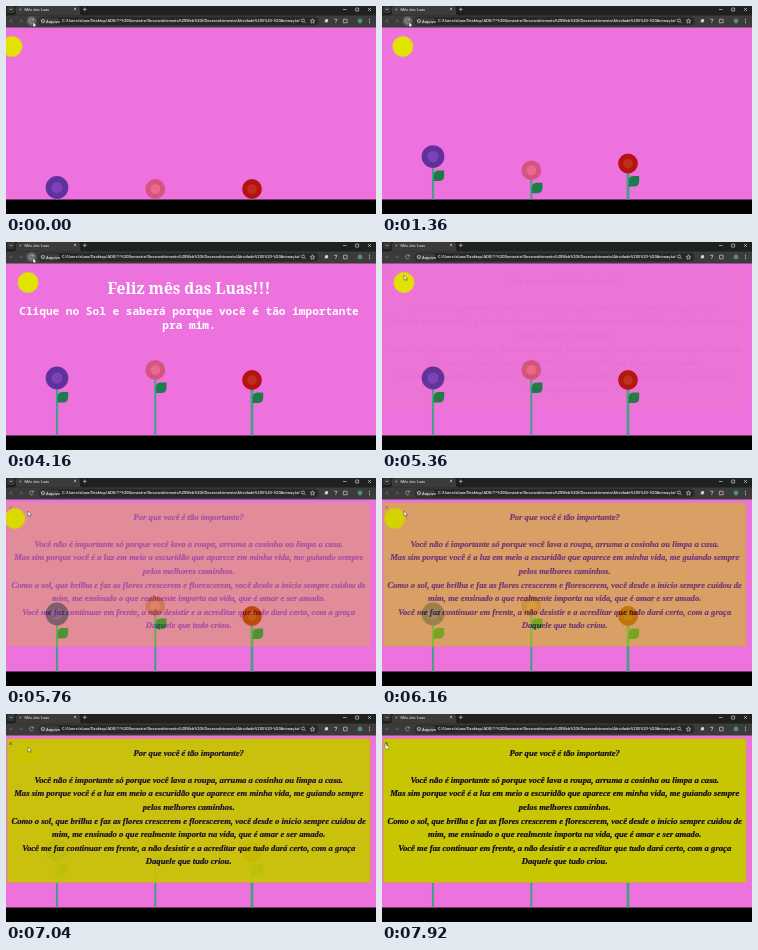
An HTML page for the animation above (8000 ms loop, 370 by 208 pixels).

```html
<!DOCTYPE html>
<html lang="pt-BR">
<head>
<meta charset="utf-8">
<title>Mês das Luas</title>
<style>
  html, body { margin: 0; width: 100%; height: 100%; overflow: hidden; background: #000; }
  svg { display: block; width: 100vw; height: 100vh; }
  .ui { font-family: Roboto, Inter, sans-serif; fill: #e6e6e6; }
  .title { font: bold 15.5px "Noto Serif", serif; }
  .mono { font: 600 11.1px "Noto Sans Mono", "DejaVu Sans Mono", monospace; }
  .letter { font: italic bold 8.65px "Liberation Serif", serif; fill: #0d0926; stroke: #0d0926; stroke-width: .2; }
  .icon { fill: none; stroke: #c8c8c8; stroke-width: .7; }
</style>
</head>
<body>
<svg viewBox="0 0 370 208">
  <defs>
    <clipPath id="page"><rect y="21" width="370" height="172.4"/></clipPath>
    <clipPath id="url"><rect x="54" y="10" width="240" height="10"/></clipPath>
  </defs>
  <rect width="370" height="208"/>

  <g clip-path="url(#page)">
    <rect y="21" width="370" height="173" fill="#ee72de"/>
    <circle id="sun" cy="40.5" r="10.3" fill="#e3e300" stroke="#e4b658" stroke-width=".7"/>
    <g id="garden"></g>
    <g id="greeting" fill="#fff" text-anchor="middle">
      <text class="title" x="183" y="51.5">Feliz mês das Luas!!!</text>
      <text class="mono" x="183" y="73">Clique no Sol e saberá porque você é tão importante</text>
      <text class="mono" x="183" y="87">pra mim.</text>
    </g>
    <g id="modal" text-anchor="middle">
      <rect x=".8" y="24.2" width="363.8" height="144.7" rx="1" fill="#d59a55"/>
      <rect x="1.6" y="25" width="362.2" height="143.1" rx="1" fill="#c8c502"/>
      <path d="M3.3 28.2l2.6 2.6m0-2.6l-2.6 2.6" stroke="#333" stroke-width=".7"/>
    </g>
  </g>

  <g class="ui">
    <rect width="370" height="10" fill="#1f2020"/>
    <rect y="9.5" width="370" height="12" fill="#3b3b3b"/>
    <path d="M7 9.6Q10 9.6 10 7V2.5Q10 0 13 0H71Q74 0 74 2.5V7Q74 9.6 77 9.6Z" fill="#3b3b3b"/>
    <rect x="1" y="0" width="8" height="7" rx="2" fill="#343535"/>
    <path class="icon" d="M3.8 2.7l1.3 1.3 1.3-1.3M68 2l2.2 2.2m0-2.2L68 4.2M77 3.3h3.6M78.8 1.5v3.6M337 3.5h3.5M349.7 2h3v3h-3zM362 2l3 3m0-3l-3 3"/>
    <circle cx="14.3" cy="3.4" r="1" fill="#888"/>
    <text x="18.5" y="5" font-size="4">Mês das Luas</text>
    <path class="icon" d="M7 15H3.5m1.7-1.7L3.5 15l1.7 1.7M13 15h3.5m-1.7-1.7l1.7 1.7-1.7 1.7" opacity=".3"/>
    <circle id="hover" cx="25.5" cy="15" r="4.8" fill="#656565"/>
    <path class="icon" d="M27.3 14a2 2 0 1 0 .1 1.8M27.5 12.5v1.6h-1.6" opacity=".7"/>
    <rect x="32.5" y="10.8" width="280" height="8.6" rx="4.3" fill="#282828"/>
    <rect x="33.5" y="11.7" width="20" height="6.8" rx="3.4" fill="#3b3b3b"/>
    <circle class="icon" cx="37" cy="15" r="1.6"/>
    <path class="icon" d="M37 14.8v.9"/>
    <text x="40" y="16.5" font-size="4" font-weight="500">Arquivo</text>
    <text x="56" y="16.4" font-size="4.05" font-weight="500" clip-path="url(#url)">C:/Users/aluno/Desktop/ADS/1º%20Semestre/Desenvolvimento%20Web%20I/Desenvolvimento/Atividade%205%20-%20Animação%20CSS...</text>
    <circle class="icon" cx="297" cy="14.5" r="1.5"/>
    <path class="icon" d="M298.2 15.7l1.4 1.4M306.5 12.7l.7 1.6 1.7.1-1.3 1.1.4 1.7-1.5-.9-1.5.9.4-1.7-1.3-1.1 1.7-.1z"/>
    <path class="icon" d="M318.5 16.7l2.8-3.4M328 13.3h3l-1.5 3.4M337.5 13.3h3.6v3.5h-3.6z"/>
    <circle cx="320.5" cy="14.7" r="1.7" fill="#d6d6d6"/>
    <circle cx="354" cy="15" r="2.4" fill="#4f8a72"/>
    <path d="M363.5 12.8v.9m0 .9v.9m0 .9v.9" stroke="#ddd" stroke-width=".9"/>
  </g>

  <g id="cursor" stroke="#222" stroke-width=".4" fill="#fff">
    <path id="arrow" d="M0 0V5.2L1.2 4.1 2 5.9 2.8 5.5 2 3.8H3.7Z"/>
    <path id="hand" d="M.7 0Q1.4 0 1.4 .8V2.2L3.6 2.7Q4.1 2.9 4 3.5L3.5 5.5H1.1L-.6 3.5 0 3V.8Q0 0 .7 0Z"/>
  </g>
</svg>
<script>
const LOOP = 8000, STEP = 80, CLICK = 5360, SUN_RETURN = 5480;
const NS = "http://www.w3.org/2000/svg";
const $ = id => document.getElementById(id);

function add(parent, tag, attrs, text) {
  const el = document.createElementNS(NS, tag);
  for (const key in attrs) el.setAttribute(key, attrs[key]);
  if (text) el.textContent = text;
  return parent.appendChild(el);
}

const flowers = [
  { x: 51, r: 11.4, outer: "#60309c", inner: "#7d40b9", from: 181.5, to: 136, grow: 2000, leaf: 14, stem: 2.1 },
  { x: 149.3, r: 9.9, outer: "#d4557f", inner: "#ef6790", from: 183, to: 128, grow: 4000, leaf: 12.5, stem: 2.1 },
  { x: 246, r: 9.9, outer: "#b71212", inner: "#bd2e1b", from: 183, to: 138, grow: 2400, leaf: 12.5, stem: 2.8 }
];
for (const f of flowers) {
  f.el = add($("garden"), "g", {});
  add(f.el, "rect", { x: -f.stem / 2, y: 0, width: f.stem, height: 80, fill: "#459f88" });
  add(f.el, "path", {
    d: "M0 10.5V5Q0 0 5.5 0H10.6V5Q10.6 10.5 5 10.5Z",
    transform: `translate(.6 ${f.leaf})`, fill: "#1c7a4b"
  });
  add(f.el, "circle", { r: f.r, fill: f.outer });
  add(f.el, "circle", { r: f.r * .49, fill: f.inner });
}

const letter = [
  "Por que você é tão importante?", "",
  "Você não é importante só porque você lava a roupa, arruma a cosinha ou limpa a casa.",
  "Mas sim porque você é a luz em meio a escuridão que aparece em minha vida, me guiando sempre",
  "pelos melhores caminhos.",
  "Como o sol, que brilha e faz as flores crescerem e florescerem, você desde o início sempre cuidou de",
  "mim, me ensinado o que realmente importa na vida, que é amar e ser amado.",
  "Você me faz continuar em frente, a não desistir e a acreditar que tudo dará certo, com a graça",
  "Daquele que tudo criou."
];
letter.forEach((line, i) => {
  if (line) add($("modal"), "text", { class: "letter", x: 182.7, y: 41.8 + i * 13.55 }, line);
});

// Tracks are rows of [time, ...values], linear between rows.
const fadeIn = [[1760, 0], [3520, 1]];
const modalFade = [[5320, 0], [5760, .31], [6160, .55], [7040, .94], [7440, 1]];
const path = [
  [4400, 27, 16], [4720, 29, 34], [4960, 25, 49], [5280, 22, 33],
  [7120, 22, 33], [7680, 3, 29.5]
];

const clamp = v => Math.min(1, Math.max(0, v));

function at(track, t) {
  if (t <= track[0][0]) return track[0].slice(1);
  for (let i = 1; i < track.length; i++) {
    const a = track[i - 1], b = track[i];
    if (t <= b[0]) {
      const p = (t - a[0]) / (b[0] - a[0]);
      return a.slice(1).map((v, k) => v + (b[k + 1] - v) * p);
    }
  }
  return track[track.length - 1].slice(1);
}

// cubic-bezier(.25, .1, .25, 1)
function ease(x) {
  let lo = 0, hi = 1, s = x;
  for (let i = 0; i < 20; i++) {
    s = (lo + hi) / 2;
    const bx = .75 * s * (1 - s) + s ** 3;
    if (bx < x) lo = s; else hi = s;
  }
  return .3 * s * (1 - s) ** 2 + 3 * s * s * (1 - s) + s ** 3;
}

function draw(t) {
  const slide = t < SUN_RETURN ? ease(clamp(t / 2000)) : clamp((t - SUN_RETURN) / 1600);
  $("sun").setAttribute("cx", 6 + 16 * slide);

  for (const f of flowers) {
    const y = f.from + (f.to - f.from) * clamp(t / f.grow);
    f.el.setAttribute("transform", `translate(${f.x} ${y})`);
  }

  $("greeting").setAttribute("opacity", t < CLICK ? at(fadeIn, t)[0] : 0);
  $("modal").setAttribute("opacity", at(modalFade, t)[0]);

  const [x, y] = at(path, t);
  const pointing = (t >= 4960 && t < CLICK) || t >= 7600;
  $("cursor").setAttribute("transform", `translate(${x} ${y})`);
  $("hand").setAttribute("visibility", pointing ? "visible" : "hidden");
  $("arrow").setAttribute("visibility", pointing ? "hidden" : "visible");
  $("hover").setAttribute("opacity", t < 4480 ? 1 : 0);
}

const start = performance.now();
function tick() {
  const t = (performance.now() - start) % LOOP;
  draw(Math.floor(t / STEP) * STEP);
  requestAnimationFrame(tick);
}
tick();
</script>
</body>
</html>
```
